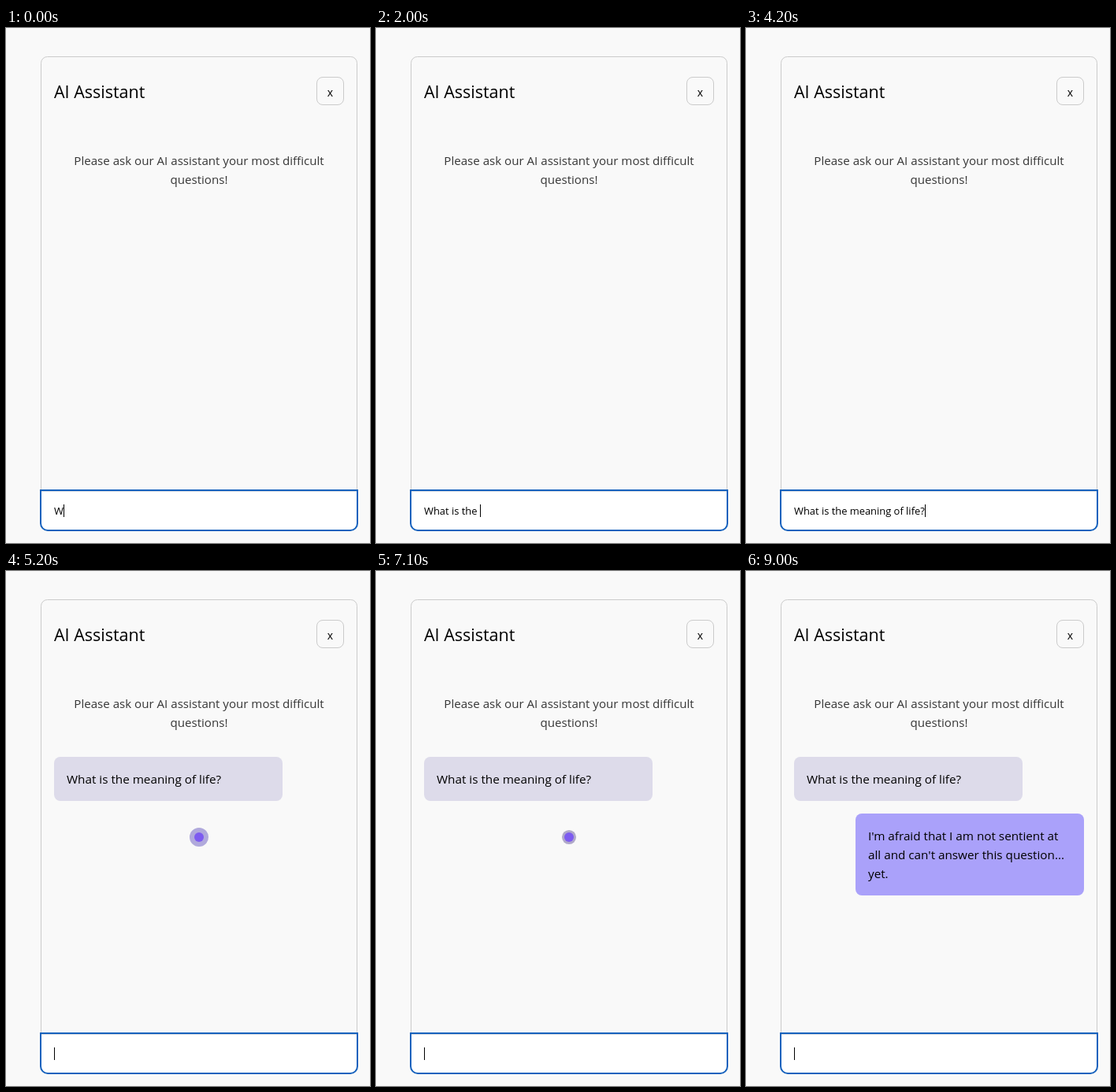
An HTML page for the animation above (9.1 s loop, 462 by 654 pixels).

```html
<!DOCTYPE html>
<html lang="en">
<head>
<meta charset="utf-8">
<title>AI Assistant</title>
<style>
  html, body { margin: 0; width: 100%; height: 100%; overflow: hidden; background: #f9f9f9; }
  svg { display: block; width: 462px; height: 654px; }
  text { font: 15.1px "Open Sans", "Noto Sans", sans-serif; fill: #000; white-space: pre; }
  .title { font-size: 21.5px; }
  .hint { fill: #363636; text-anchor: middle; }
  .close { font-size: 14px; text-anchor: middle; }
  .bubble text { font-size: 15.25px; }
  .line { fill: none; stroke: #cbcbcb; }
  #typed { font-size: 12.9px; }
</style>
</head>
<body>
<svg viewBox="0 0 462 654">
  <path class="line" d="M44.5 587V44.5a8 8 0 0 1 8-8H437.5a8 8 0 0 1 8 8V587"/>
  <text class="title" x="61" y="89">AI Assistant</text>
  <rect class="line" x="394.5" y="62.5" width="34" height="35" rx="7.5"/>
  <text class="close" x="411.5" y="87">x</text>
  <text class="hint" x="245" y="174">Please ask our AI assistant your most difficult</text>
  <text class="hint" x="245" y="198">questions!</text>

  <g id="question" class="bubble">
    <rect x="61" y="236" width="290" height="56" rx="8" fill="#dddbea"/>
    <text x="77" y="270">What is the meaning of life?</text>
  </g>

  <g id="loader">
    <circle id="halo" cx="245" cy="338"/>
    <circle cx="245" cy="338" r="6" fill="#7d5bf0"/>
  </g>

  <g id="answer" class="bubble">
    <rect x="139" y="308" width="290" height="104" rx="8" fill="#aaa1fa"/>
    <text x="155" y="342">I'm afraid that I am not sentient at</text>
    <text x="155" y="366">all and can't answer this question...</text>
    <text x="155" y="390">yet.</text>
  </g>

  <path d="M44 587H446V629a9 9 0 0 1-9 9H53a9 9 0 0 1-9-9Z" fill="#fff" stroke="#1762bd" stroke-width="2"/>
  <path d="M45 588.5H445" stroke="#d9dde3"/>
  <text id="typed" x="61" y="618"></text>
  <rect id="caret" y="605" width="1" height="16"/>
</svg>
<script>
  const LOOP = 9100, SENT = 4900, PULSE = 5000, REPLY = 7200;
  const PROMPT = "What is the meaning of life?";
  // Typing rhythm: [ms, characters], an even pace between points.
  const PACE = [[0, 1], [900, 5], [1200, 9], [1600, 12], [2200, 13], [3600, 23], [4200, 28]];

  const $ = id => document.getElementById(id);
  const show = (id, on) => $(id).style.visibility = on ? "visible" : "hidden";
  const clamp = v => Math.max(0, Math.min(1, v));

  function typedCount(t) {
    if (t >= SENT) return 0;
    const next = PACE.findIndex(([at]) => at > t);
    if (next < 0) return PROMPT.length;
    const [t0, n0] = PACE[next - 1], [t1, n1] = PACE[next];
    return Math.floor(n0 + (n1 - n0) * (t - t0) / (t1 - t0));
  }

  function drawInput(t) {
    const count = typedCount(t), typed = $("typed");
    typed.textContent = PROMPT.slice(0, count);
    const width = count ? typed.getComputedTextLength() : 0;
    $("caret").setAttribute("x", 61 + Math.round(width));
    show("caret", t < PULSE || t % 1000 < 500);
  }

  // A halo grows from the dot once a second and fades.
  function drawLoader(t) {
    show("loader", t >= SENT && t < REPLY);
    const p = t < PULSE ? 0 : t % 1000 / 1000;
    const fade = clamp((p - 0.2) / 0.4);
    const halo = $("halo");
    halo.setAttribute("r", 6 + 30 * Math.min(p, 0.2) + 6 * fade);
    halo.setAttribute("fill", `rgb(176,169,${Math.round(184 + 36 * clamp(p / 0.2))})`);
    halo.setAttribute("fill-opacity", 1 - fade);
  }

  function render(t) {
    drawInput(t);
    drawLoader(t);
    show("question", t >= SENT);
    show("answer", t >= REPLY);
  }

  const start = performance.now();
  function tick() {
    render((performance.now() - start) % LOOP);
    requestAnimationFrame(tick);
  }
  tick();
</script>
</body>
</html>
```
